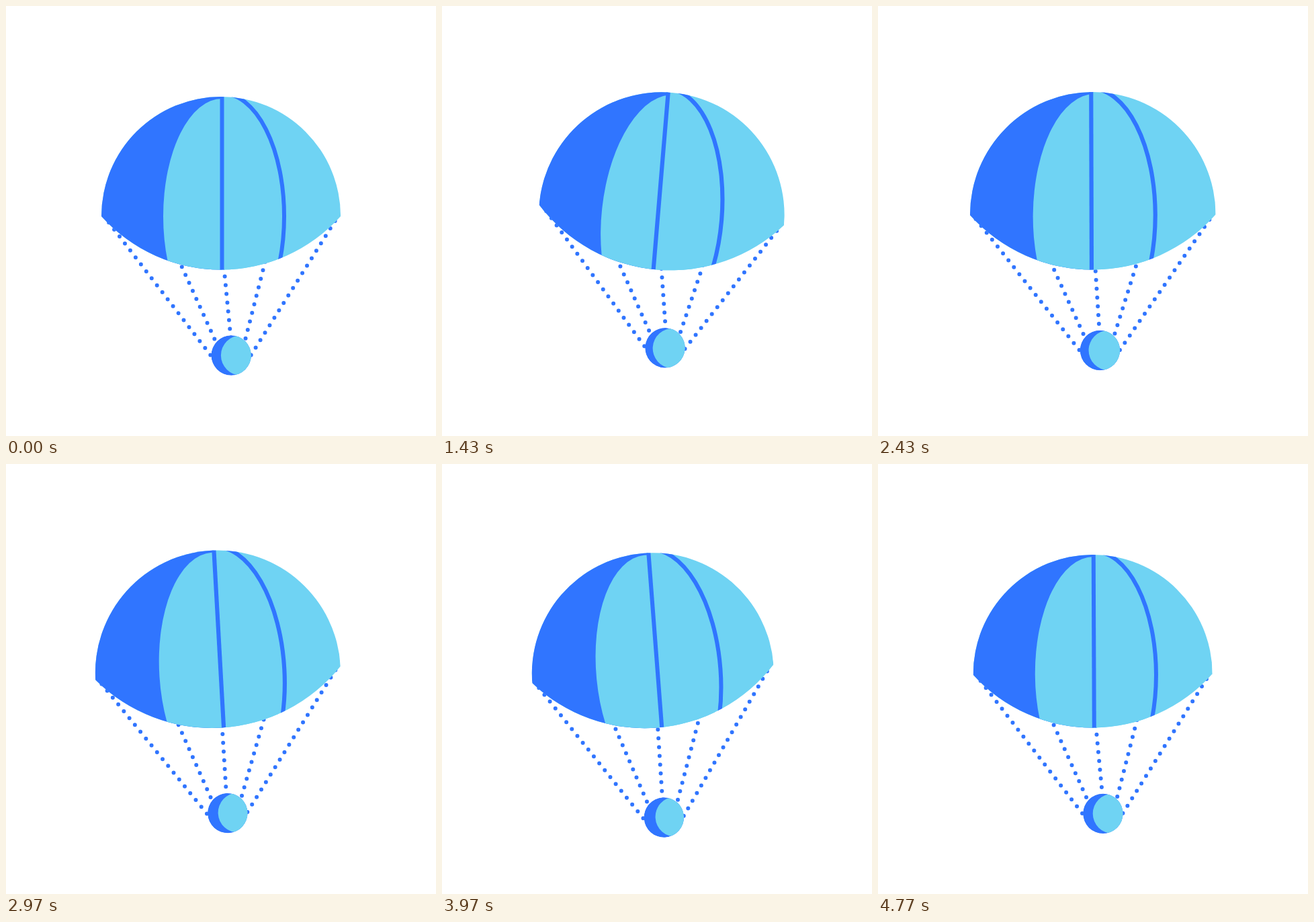
Write an HTML page that moves like this. It is 640x640 px and loops after 4810 ms.

```html
<!DOCTYPE html>
<html lang="en">
<head>
<meta charset="utf-8">
<title>Parachute</title>
<style>
  html, body { margin: 0; width: 100%; height: 100%; overflow: hidden; background: #fff; }
  svg { display: block; width: 100%; height: 100%; }
  .dark { fill: #3075ff; }
  .light { fill: #6fd3f3; }
  .seam { fill: none; stroke: #3075ff; stroke-width: 6; }
  .rope { stroke: #3075ff; stroke-width: 6; stroke-linecap: round; stroke-dasharray: 0 13.08; }
</style>
</head>
<body>
<svg viewBox="0 0 640 640">
  <defs>
    <clipPath id="dome">
      <path d="M-178 -79.5A178 178 0 0 1 178 -79.5A239 239 0 0 1 -178 -79.5Z"/>
    </clipPath>
    <clipPath id="disc"><circle r="29.7"/></clipPath>
  </defs>
  <g id="ropes"></g>
  <g id="canopy">
    <g clip-path="url(#dome)">
      <rect class="light" x="-200" y="-280" width="400" height="300"/>
      <rect id="shade" class="dark" x="-200" y="-280" height="300"/>
      <ellipse id="panel" class="light" rx="87.5" ry="175"/>
      <g id="seams" class="seam">
        <path d="M0 -280V20"/>
        <path d="M0 -262.5A92.5 183 0 0 1 0 103.5"/>
      </g>
    </g>
  </g>
  <g id="ball">
    <g clip-path="url(#disc)">
      <circle class="dark" r="30"/>
      <circle id="glow" class="light" r="29.7"/>
    </g>
  </g>
</svg>
<script>
const LOOP = 4810;
const PIVOT = { x: 320, y: 392.5 };

// Middle, inner and outer rope, mirrored to the left: point on the ball, point on the canopy
const ROPES = [
  { rim: [0, -26.4], top: [1.5, -32.5] },
  { rim: [18.8, -12.6], top: [71, -32.5] },
  { rim: [30.2, -0.5], top: [174, -79.5] }
];

const $ = id => document.getElementById(id);
const set = (node, attrs) => {
  for (const name in attrs) node.setAttribute(name, attrs[name]);
};
const ramp = (p, from, to) => Math.min(1, Math.max(0, (p - from) / (to - from)));
const smooth = u => u * u * (3 - 2 * u);

// Two-harmonic periodic curve
function wave(p, mid, c1, s1, c2, s2) {
  const a = 2 * Math.PI * p;
  return mid + c1 * Math.cos(a) + s1 * Math.sin(a) + c2 * Math.cos(2 * a) + s2 * Math.sin(2 * a);
}

function place([x, y], origin, tilt, scale) {
  const a = tilt * Math.PI / 180;
  const c = Math.cos(a) * scale;
  const s = Math.sin(a) * scale;
  return [origin.x + x * c - y * s, origin.y + x * s + y * c];
}

const lines = [-2, -1, 0, 1, 2].map(k => {
  const node = document.createElementNS("http://www.w3.org/2000/svg", "line");
  node.setAttribute("class", "rope");
  $("ropes").appendChild(node);
  const side = k < 0 ? -1 : 1;
  const { rim, top } = ROPES[Math.abs(k)];
  return { node, rim: [side * rim[0] - 0.7, rim[1]], top: [side * top[0], top[1]] };
});

function draw(ms) {
  const p = (ms % LOOP) / LOOP;
  const a = 2 * Math.PI * p;
  const tilt = 4.9 * Math.sin(a) - 0.15 * Math.sin(3 * a);
  const swell = smooth(ramp(p, 0, 0.21)) - ramp(p, 0.505, 0.906) ** 2.5;
  const scale = 1 + 0.0272 * swell;
  const sway = wave(p, -0.115, 0.27, -0.88, -0.154, 0.09);
  const drift = p < 0.75 ? 1 - p / 0.75 : 4 * p - 3;
  const ball = {
    x: 329.5 + 5.7 * drift ** 1.6,
    y: wave(p, 516.95, 3.9, -7.9, -0.85, 0.3)
  };
  const ballTilt = 0.75 * tilt;
  const seam = 1.5 + 7 * sway;
  const panel = 1.5 + sway * (2.3 + 1.6 * sway);

  set($("canopy"), { transform: `translate(${PIVOT.x} ${PIVOT.y}) rotate(${tilt}) scale(${scale})` });
  set($("shade"), { width: 200 + seam });
  set($("panel"), { transform: `translate(${panel} -79.5) rotate(${-1.5 * sway})` });
  set($("seams"), { transform: `translate(${seam} 0)` });

  set($("ball"), { transform: `translate(${ball.x} ${ball.y}) rotate(${ballTilt})` });
  set($("glow"), { cx: 14.4 + 3.2 * sway });

  for (const { node, rim, top } of lines) {
    const [x1, y1] = place(rim, ball, ballTilt, 1);
    const [x2, y2] = place(top, PIVOT, tilt, scale);
    set(node, { x1, y1, x2, y2 });
  }
}

const start = performance.now();
function tick() {
  draw(performance.now() - start);
  requestAnimationFrame(tick);
}
tick();
</script>
</body>
</html>
```
